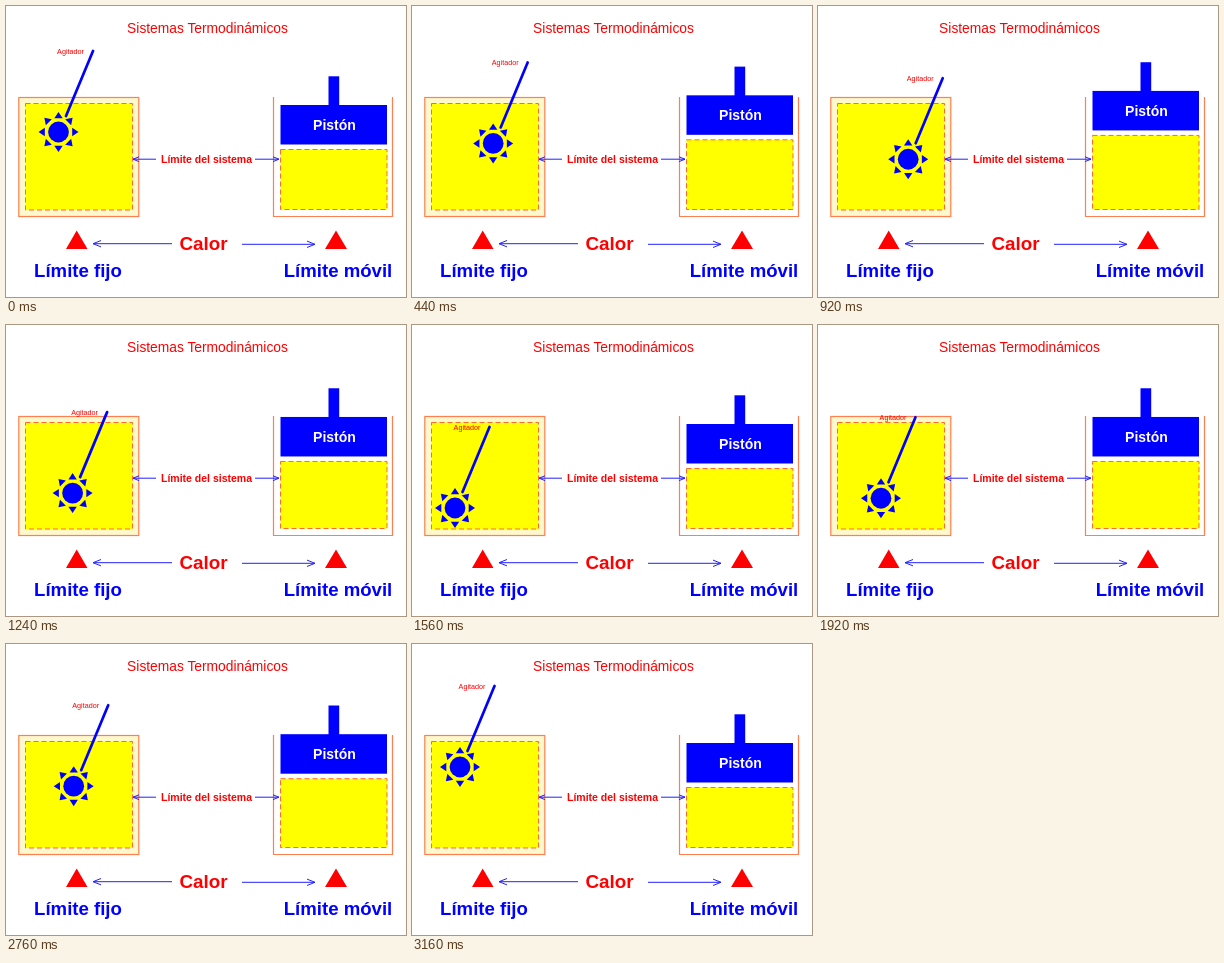
Write an HTML page that moves like this. It is 400x291 px and loops after 3.2 s.

```html
<!DOCTYPE html>
<html lang="es">
<head>
<meta charset="utf-8">
<style>
html, body { margin: 0; width: 100%; height: 100%; overflow: hidden; background: #fff; }
svg { display: block; width: 100vw; height: 100vh; font-family: "Liberation Sans", Arial, sans-serif; }
text { text-anchor: middle; }
.red { fill: #f00; }
.blue { fill: #00f; }
.bold { font-weight: bold; }
.wall { stroke: #ff7f50; stroke-width: 1.2; }
.gas { fill: #ff0; stroke: #ff6a30; stroke-width: 1; stroke-dasharray: 5 3; }
.arrow { fill: none; stroke: #22f; stroke-width: 1; }
</style>
</head>
<body>
<svg viewBox="0 0 400 291">
  <text class="red" x="201.5" y="27" font-size="13.8">Sistemas Termodinámicos</text>

  <rect class="wall" x="12.8" y="91.5" width="120" height="119" fill="#fff8cc"/>
  <rect class="gas" x="19.5" y="97.5" width="107" height="106.5"/>
  <path class="wall" fill="none" d="M267.5 91V210.5H386.5V91"/>
  <rect class="gas" id="gas" x="274.5" width="106.5"/>
  <g id="piston">
    <rect class="blue" x="322.5" y="70.3" width="10.7" height="30"/>
    <rect class="blue" x="274.5" y="99" width="106.5" height="39.5"/>
    <text class="bold" x="328.5" y="124" font-size="14" fill="#fff">Pistón</text>
  </g>

  <g id="arrows"></g>
  <text class="red bold" x="200.5" y="156.8" font-size="10.5">Límite del sistema</text>
  <text class="red bold" x="197.5" y="244" font-size="18.8">Calor</text>
  <path class="red" d="M70.7 224.5L81.5 243H60ZM330 224.5L341 243H319Z"/>
  <text class="blue bold" x="72" y="271.3" font-size="18.6">Límite fijo</text>
  <text class="blue bold" x="332" y="271.3" font-size="18.6">Límite móvil</text>

  <g id="stirrer">
    <path d="M7.5 -16L34.5 -81" stroke="#00f" stroke-width="2.7" stroke-linecap="round"/>
    <circle class="blue" r="10.4"/>
    <g class="blue" id="rays"></g>
    <text class="red" x="12" y="-78" font-size="7.2">Agitador</text>
  </g>
</svg>
<script>
const LOOP = 3200, STEP = 40, BOTTOM = 203.5;
// Stirrer waypoints: [step, x, y]
const ROUTE = [[0, 52.5, 126], [19, 102, 145.8], [39, 43, 183], [59, 87.4, 161.3], [79, 48, 123]];
const el = id => document.getElementById(id);

el('rays').innerHTML = Array.from({ length: 8 }, (_, i) =>
  `<path d="M20 0L13.7 -4.2V4.2Z" transform="rotate(${i * 45})"/>`).join('');

// Line from tail to tip with an open head
function arrow(tail, tip, y, size) {
  const back = tip + Math.sign(tail - tip) * size, half = size * 0.4;
  return `<path class="arrow" d="M${tail} ${y}H${tip}M${back} ${y - half}L${tip} ${y}L${back} ${y + half}"/>`;
}
el('arrows').innerHTML = arrow(150, 127, 153.2, 6) + arrow(249, 273, 153.2, 6) +
  arrow(166, 87, 237.7, 8) + arrow(236, 309, 238.3, 8);

function position(step) {
  const i = ROUTE.findIndex((p, n) => n > 0 && step <= p[0]);
  const [s0, x0, y0] = ROUTE[i - 1], [s1, x1, y1] = ROUTE[i];
  const u = (step - s0) / (s1 - s0);
  return [x0 + (x1 - x0) * u, y0 + (y1 - y0) * u];
}

function draw(ms) {
  const step = Math.floor((ms % LOOP) / STEP);
  el('stirrer').setAttribute('transform', `translate(${position(step)})`);

  const phase = step % 40;
  const lift = 0.88 * Math.min(phase, 39 - phase);
  const top = 143.5 - lift;
  el('piston').setAttribute('transform', `translate(0 ${-lift})`);
  el('gas').setAttribute('y', top);
  el('gas').setAttribute('height', BOTTOM - top);
}

const start = performance.now();
function tick() {
  draw(performance.now() - start);
  requestAnimationFrame(tick);
}
tick();
</script>
</body>
</html>
```
